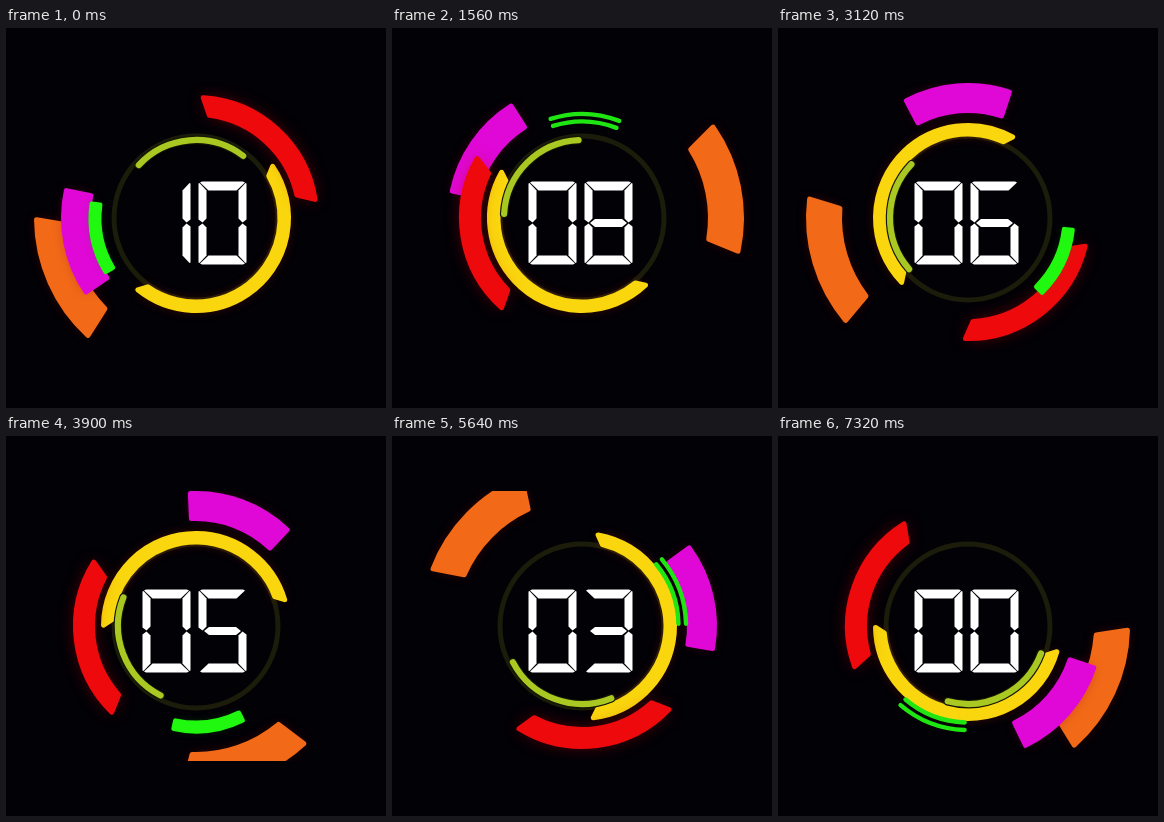
Animation of 380 by 380 pixels, one loop 7.38 s. Source, as an HTML page with a canvas:

```html
<!DOCTYPE html>
<html lang="en">
<head>
<meta charset="utf-8">
<title>Countdown</title>
<style>
html, body { margin: 0; width: 100%; height: 100%; overflow: hidden; background: #020106; }
canvas { display: block; }
</style>
</head>
<body>
<canvas id="stage" width="380" height="380"></canvas>
<script>
const ctx = document.getElementById('stage').getContext('2d');
const LOOP = 7380, STEP = 60, SECOND = 720, C = 190;
const rad = deg => deg * Math.PI / 180;
const arcDegrees = (length, radius) => length / radius * 180 / Math.PI;

function glow(color, blur) {
  ctx.shadowColor = color || 'transparent';
  ctx.shadowBlur = blur || 0;
}

// Thick band with softened corners; the inner edge is shorter by `inset` degrees at each end.
function band(mid, span, inner, outer, inset, color, halo, blur) {
  const soft = 2.5, half = span / 2 - arcDegrees(soft, outer);
  ctx.beginPath();
  ctx.arc(C, C, outer - soft, rad(mid - half), rad(mid + half));
  ctx.arc(C, C, inner + soft, rad(mid + half - inset), rad(mid - half + inset), true);
  ctx.closePath();
  ctx.fillStyle = ctx.strokeStyle = color;
  ctx.lineWidth = soft * 2;
  ctx.lineJoin = 'round';
  glow(halo, blur);
  ctx.fill();
  glow();
  ctx.stroke();
}

function line(mid, span, radius, width, color) {
  const half = span / 2 - arcDegrees(width / 2, radius);
  ctx.beginPath();
  ctx.arc(C, C, radius, rad(mid - half), rad(mid + half));
  ctx.lineCap = 'round';
  ctx.lineWidth = width;
  ctx.strokeStyle = color;
  ctx.stroke();
}

// Seven-segment digits
const W = 49, H = 83;
const CAP = [[4, 0], [45, 0], [47, 1], [38.5, 9], [10.5, 9], [2, 1]];
const SIDE = [[0.5, 2], [1.5, 1.5], [8.5, 9], [8.5, 37], [4.5, 41], [0.5, 38]];
const BAR = [[6, 41.5], [11, 37.5], [38, 37.5], [43, 41.5], [38, 45.5], [11, 45.5]];
const flipX = p => p.map(([x, y]) => [W - x, y]);
const flipY = p => p.map(([x, y]) => [x, H - y]);
const SEGMENTS = {
  a: CAP, b: flipX(SIDE), c: flipX(flipY(SIDE)), d: flipY(CAP),
  e: flipY(SIDE), f: SIDE, g: BAR
};
const DIGITS = ['abcdef', 'bc', 'abged', 'abgcd', 'fgbc', 'afgcd', 'afgecd', 'fabc', 'abcdefg', 'abcdfg'];

function digit(n, left, top) {
  ctx.fillStyle = '#fff';
  for (const s of DIGITS[n]) {
    ctx.beginPath();
    for (const [x, y] of SEGMENTS[s]) ctx.lineTo(left + x, top + y);
    ctx.fill();
  }
}

function draw(t) {
  // The rings start softly, then turn at constant speed.
  const m = t < 300 ? t * t / 600 : t - 150;
  const brake = Math.min(Math.max(m - 5540, 0), 1403);
  const redTime = Math.min(m, 5540) + brake - brake * brake / 2806;

  const yellow = 47.5 + 0.0572 * m;
  const lime = 265 - 0.0282 * m;
  const green = 168.5 + 0.0732 * m + 0.2195 * Math.max(0, m - 4902);
  const magenta = 169 + 0.0324 * m;
  const red = 312.3 + 0.1549 * redTime;
  const orange = 156 - 0.1187 * m;

  ctx.fillStyle = '#020106';
  ctx.fillRect(0, 0, 380, 380);
  ctx.save();
  ctx.beginPath();
  ctx.rect(0, 55, 380, 270);
  ctx.clip();

  ctx.beginPath();
  ctx.arc(C, C, 82, 0, 7);
  ctx.lineWidth = 5;
  ctx.strokeStyle = '#1b1d0a';
  ctx.stroke();

  band(orange, 48.5, 126, 162, 2.5, '#f26a18', '#a0140070', 12);
  band(yellow, 166, 81.5, 95, 4, '#fad60e', '#c0280070', 12);
  line(lime, 91, 78, 8.5, '#141604');
  line(lime, 89, 78, 6.2, '#aac822');
  band(magenta, 48, 105, 135, 0, '#e008d6', '#a0003070', 12);
  band(red, 80, 101, 123, 4, '#ee0a0c', '#c0000880', 16);

  if (Math.floor(t / 474) % 2) {
    line(green, 41, 96.5, 4.4, '#1fe612');
    line(green, 41, 104, 4.4, '#1fe612');
  } else {
    band(green, 41, 94.5, 107.5, 0, '#20f810', '#0a8a0870', 8);
  }
  ctx.restore();

  const left = 10 - Math.min(10, Math.floor(t / SECOND));
  digit(Math.floor(left / 10), 136, 153.5);
  digit(left % 10, 192, 153.5);
}

const start = performance.now();
function tick() {
  const t = (performance.now() - start) % LOOP;
  draw(Math.floor(t / STEP) * STEP);
  requestAnimationFrame(tick);
}
tick();
</script>
</body>
</html>
```
